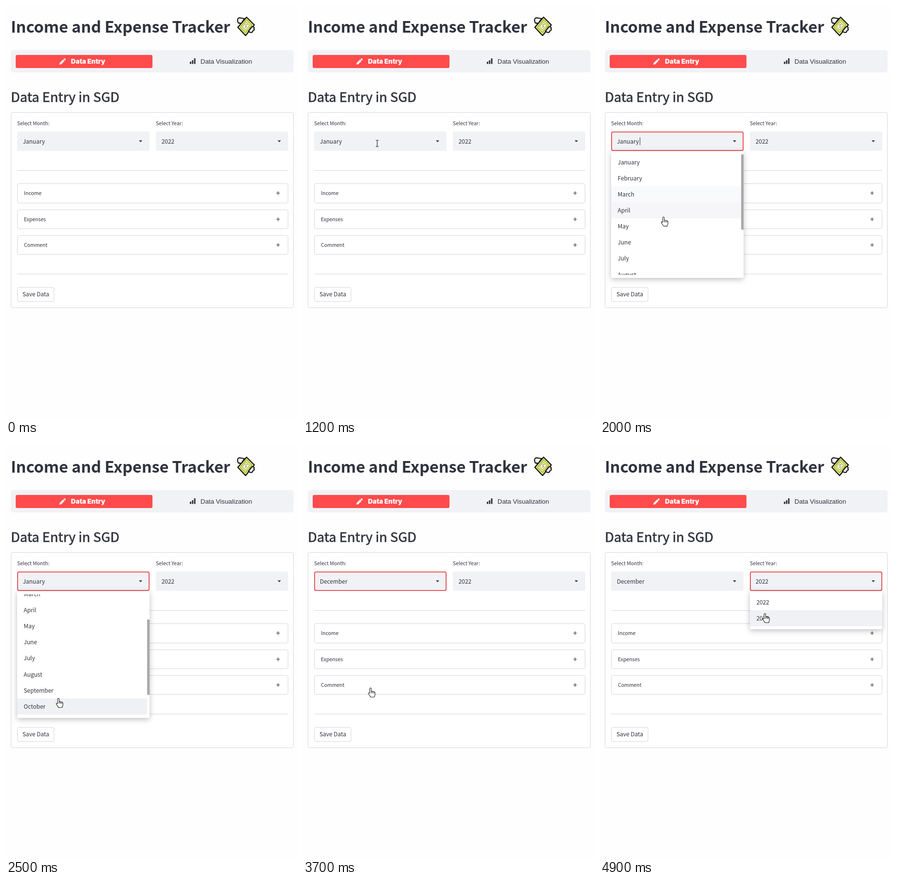
These frames come from a looping animation (600x850 px, 5000 ms). An HTML page:

```html
<!DOCTYPE html>
<html lang="en">
<head>
<meta charset="utf-8">
<title>Income and Expense Tracker</title>
<style>
  html, body { margin: 0; width: 100%; height: 100%; overflow: hidden; background: #fefefe; }
  svg { display: block; width: 600px; height: 850px; }
  text { font: 11.93px "Noto Sans CJK JP", "Noto Sans CJK SC", "Noto Sans CJK", "Noto Sans", sans-serif; fill: #31333f; }
  .small { font-size: 10.44px; }
  .h1 { font-size: 32.7px; font-weight: 700; letter-spacing: -.005em; }
  .h2 { font-size: 27.3px; stroke: #31333f; stroke-width: .6px; }
  .tab { font: 13.33px "Liberation Sans", Arial, sans-serif; }
  .active { font: 900 13.4px Inter, sans-serif; fill: #fff; }
  .box { fill: #fff; stroke: #d6d6de; }
  .select { fill: #f0f2f6; }
  .focus { fill: none; stroke: #e5474a; stroke-width: 1.8; }
  .rule { stroke: #d6d6de; }
  .row { fill: #f0f1f4; }
  .menu { fill: #fff; filter: drop-shadow(0 3px 6px rgba(0, 0, 0, .25)); }
  .caret { stroke: #31333f; }
  .ink { fill: #31333f; }
  .plus { stroke: #31333f; stroke-width: 1.2; }
  .cursor { fill: #fff; stroke: #222; stroke-width: 1.1; stroke-linejoin: round; }
</style>
</head>
<body>
<svg viewBox="0 0 600 850">
  <defs><clipPath id="view"><rect x="23" y="306" width="273" height="249"/></clipPath></defs>

  <text class="h1" x="10" y="55">Income and Expense Tracker</text>
  <g stroke="#111" stroke-width="2.2" stroke-linejoin="round">
    <path fill="#dfe77c" d="M496 23L512 39L494 61L478 44Z"/>
    <path fill="none" stroke="#9aa83a" stroke-width="1.2" d="M496 28L507 39L494 55L483 44Z"/>
    <path fill="#fff" stroke="#8f9a45" stroke-width="1" d="M495 34l7 6-8 9-6-6z"/>
    <path fill="none" stroke="#8a9435" stroke-width="1.4" d="M498 39c-3-2-5 0-3 2s0 4-3 2"/>
    <path fill="#fff" d="M478 32C476 26 480 23 485 25L492 26L487 33C485 36 483 37 482 35C480 36 478 35 478 32Z"/>
    <path fill="#fff" d="M500 52L507 43C510 42 513 44 511 47C513 49 511 51 509 51C509 55 504 56 500 52Z"/>
  </g>

  <rect class="select" x="10" y="91" width="583" height="46" rx="5"/>
  <rect x="20" y="101" width="282" height="27" rx="3" fill="#ff4b4b"/>
  <path fill="#fff" d="M110 121l.8-3.8 7-7 3 3-7 7zM118.600 109.400l1-1c.6-.6 1.300-.6 1.900 0l1.100 1.100c.6.6.6 1.300 0 1.900l-1 1z"/>
  <text class="active" x="134" y="119">Data Entry</text>
  <path class="ink" d="M379 115h3v4.500h-3zM383.300 112h3v7.500h-3zM387.700 108h3v11.500h-3z"/>
  <text class="tab" x="401" y="119">Data Visualization</text>

  <text class="h2" x="10" y="198">Data Entry in SGD</text>
  <rect class="box" x="10.500" y="219.500" width="582" height="403" rx="3"/>
  <g id="form"></g>
  <path class="rule" d="M23 339.500H582M23 553H582"/>
  <rect class="box" x="23.500" y="580.500" width="75.500" height="29" rx="3"/>
  <text x="34" y="599">Save Data</text>

  <g id="monthMenu">
    <rect class="menu" x="23" y="300" width="273" height="261" rx="3"/>
    <g clip-path="url(#view)"><g id="months"></g></g>
    <rect id="thumb" x="291" width="5" height="155.500" rx="1" fill="#a9a9a9"/>
  </g>
  <g id="yearMenu">
    <rect class="menu" x="309" y="300" width="273" height="78" rx="3"/>
    <g id="years"></g>
  </g>

  <g id="pointer">
    <path id="beam" fill="none" stroke="#222" stroke-width="1.100" d="M-3-6.500h2q1 0 1 1q0-1 1-1h2M0-6V6M-3 6.500h2q1 0 1-1q0 1 1 1h2"/>
    <g id="hand" class="cursor">
      <path d="M-1.600 9V1.200a1.600 1.600 0 0 1 3.200 0V7c.5-1 2.600-.8 2.800.4c.6-.9 2.400-.6 2.600.6c.8-.7 2.300-.2 2.300 1.300v4c0 2-1.300 3-1.300 5.200H.2c-1-2.600-3.600-4.600-4.600-7.200c-.5-1.600 1.500-2.200 2.800-.6z"/>
      <path d="M1.600 7v3.500M4.400 8v2.800M7 8.600v2.400"/>
    </g>
    <path id="arrow" class="cursor" d="M0 0V15l3.500-3.300 2.300 5.300 2.200-1-2.300-5H10.500z"/>
  </g>
</svg>
<script>
const $ = id => document.getElementById(id);
const show = (id, on) => $(id).setAttribute("display", on ? "inline" : "none");
const ROW = 33.15, TOP = 305.5;
const LOOP = 5000, STEP = 100;
const MONTH_OPEN = 1600, MONTH_PICK = 3400, MONTH_BLUR = 4200, YEAR_OPEN = 4400;
const MONTHS = ["January", "February", "March", "April", "May", "June", "July",
  "August", "September", "October", "November", "December"];

const select = (id, label, value, x) => `
  <text class="small" x="${x}" y="246">${label}</text>
  <rect class="select" x="${x}" y="259" width="273" height="40" rx="3"/>
  <rect class="focus" id="${id}Focus" x="${x + .9}" y="259.9" width="271.2" height="38.2" rx="3"/>
  <text id="${id}Value" x="${x + 11.700}" y="283.500">${value}</text>
  <path class="caret" id="${id}Caret" d="M${x + 59.500} 271v16"/>
  <path class="ink" d="M${x + 251} 277.300h7l-3.500 3.700z"/>`;

const expander = (label, y, h) => `
  <rect class="box" x="23.500" y="${y + .5}" width="558" height="${h}" rx="3"/>
  <text class="small" x="37" y="${y + 24}">${label}</text>
  <path class="plus" d="M557.300 ${y + 20}h7.400m-3.700-3.700v7.400"/>`;

const rows = (names, x, w) => names.map((name, i) => `
  <rect class="row" x="${x}" y="${TOP + i * ROW}" width="${w}" height="${ROW}"/>
  <text x="${x + 13.500}" y="${TOP + i * ROW + 21}">${name}</text>`).join("");

$("form").innerHTML = select("month", "Select Month:", "January", 23)
  + select("year", "Select Year:", "2022", 309)
  + expander("Income", 366, 40) + expander("Expenses", 420, 39) + expander("Comment", 473, 39);
$("months").innerHTML = rows(MONTHS, 23, 268);
$("years").innerHTML = rows(["2022", "2023"], 309, 273);

// Eased values between keys of the form [time, ...values]
function track(keys, t) {
  const n = keys.findIndex(k => k[0] > t);
  if (n < 0) return keys[keys.length - 1].slice(1);
  if (n === 0) return keys[0].slice(1);
  const a = keys[n - 1], b = keys[n];
  const u = (t - a[0]) / (b[0] - a[0]), e = u * u * (3 - 2 * u);
  return a.slice(1).map((v, i) => v + (b[i + 1] - v) * e);
}

const pointerAt = t => track([
  [800, 200, 294], [1100, 153, 283.5], [1600, 153, 283.5], [2050, 130, 441], [2250, 108, 521],
  [2650, 108, 521], [3000, 100, 534], [3550, 100, 534], [4200, 390, 279],
  [4400, 390, 279], [4800, 340, 346]], t);
const scrollAt = t => track([[2100, 0], [2300, 83], [2650, 83], [3000, 149]], t)[0];

// Share of the last moments the pointer spent over each row
function paintHover(id, t, scroll) {
  document.querySelectorAll(`#${id} .row`).forEach((row, i) => {
    let hits = 0;
    for (let k = 0; k < 8; k++) {
      const s = t - k * 20;
      if (Math.floor((pointerAt(s)[1] + scroll(s) - TOP) / ROW) === i) hits++;
    }
    row.setAttribute("opacity", hits / 8);
  });
}

function draw(t) {
  const monthOpen = t >= MONTH_OPEN && t < MONTH_PICK;
  const yearOpen = t >= YEAR_OPEN;
  const blink = start => (t - start) % 1000 < 500;
  show("monthMenu", monthOpen);
  show("yearMenu", yearOpen);
  show("monthCaret", monthOpen && blink(MONTH_OPEN));
  show("yearCaret", yearOpen && blink(YEAR_OPEN));
  $("yearCaret").setAttribute("transform", "translate(-20 0)");
  $("monthValue").textContent = t < MONTH_PICK ? "January" : "December";
  $("monthFocus").setAttribute("opacity",
    t < MONTH_OPEN ? 0 : Math.max(0, Math.min(1, 1 - (t - MONTH_BLUR) / 160)));
  $("yearFocus").setAttribute("opacity", yearOpen ? 1 : 0);

  const scroll = scrollAt(t);
  $("months").setAttribute("transform", `translate(0 ${-scroll})`);
  $("thumb").setAttribute("y", 306 + scroll * .626);
  if (monthOpen) paintHover("months", t, scrollAt);
  if (yearOpen) paintHover("years", t, () => 0);

  const [x, y] = pointerAt(t);
  const within = (l, r, top, bottom) => x >= l && x <= r && y >= top && y <= bottom;
  const beam = within(23, 296, 259, 299) || within(309, 582, 259, 299);
  const hand = !beam && (monthOpen || yearOpen || t < MONTH_PICK + 200
    || [366, 420, 473].some(top => within(23, 582, top, top + 40)));
  show("pointer", t >= 900);
  show("beam", beam);
  show("hand", hand);
  show("arrow", !beam && !hand);
  $("pointer").setAttribute("transform", `translate(${x} ${y})`);
}

const start = performance.now();
function frame() {
  const t = (performance.now() - start) % LOOP;
  draw(Math.floor(t / STEP) * STEP);
  requestAnimationFrame(frame);
}
frame();
</script>
</body>
</html>
```
